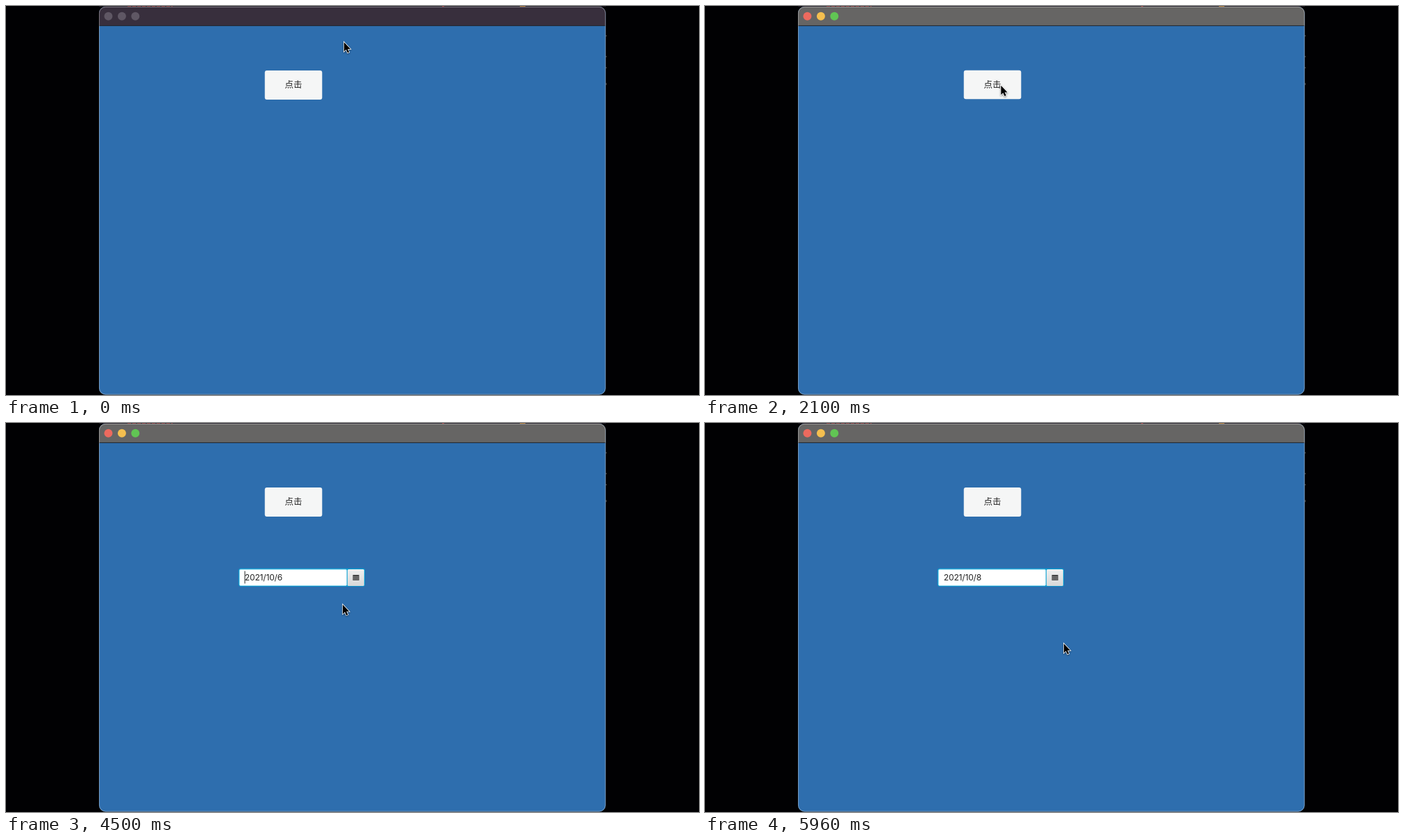
An HTML page that plays this animation: 998x561 px, repeating every 6 s.

```html
<!DOCTYPE html>
<html lang="zh">
<head>
<meta charset="utf-8">
<style>
  html, body { margin: 0; height: 100%; overflow: hidden; background: #000; }
  svg { display: block; }
  text { font: 12.4px Inter, "Noto Sans CJK SC", "Noto Sans CJK JP", sans-serif; fill: #222; }
  .mid { text-anchor: middle; }
  .cjk { font-family: "Noto Sans CJK SC", "Noto Sans CJK JP", sans-serif; }
  .week { font-size: 11.2px; font-weight: 700; }
  .line { fill: none; stroke: #555; }
  #date { font-size: 12px; letter-spacing: -.15px; }
  #popup { filter: drop-shadow(0 4px 3px rgba(0, 0, 0, .4)); }
  #cursor { filter: drop-shadow(0 1px 1px rgba(0, 0, 0, .45)); }
</style>
</head>
<body>
<svg width="998" height="561" viewBox="0 0 998 561">
  <defs>
    <linearGradient id="arrowFill" x2="0" y2="1">
      <stop stop-color="#f0f0f0"/><stop offset="1" stop-color="#d8d8d8"/>
    </linearGradient>
    <linearGradient id="headFill" x2="0" y2="1">
      <stop stop-color="#dadada"/><stop offset="1" stop-color="#ececec"/>
    </linearGradient>
    <linearGradient id="fieldFill" x2="0" y2="1">
      <stop stop-color="#ececec"/><stop offset=".14" stop-color="#fff"/>
    </linearGradient>
    <clipPath id="frame"><rect x="134" y="1" width="729.5" height="559.5" rx="9"/></clipPath>
  </defs>

  <!-- desktop and window -->
  <rect width="998" height="561" fill="#010103"/>
  <path d="M134 .5H864" stroke="#1c1822"/>
  <path d="M175 .5H240" stroke="#6e2326" stroke-dasharray="5 2"/>
  <path d="M628 .5h3" stroke="#8e2a2a"/>
  <path d="M740 .5h8" stroke="#9a6420"/>
  <path d="M864.3 42v2M864.3 72v2M864.3 88v2M864.3 111v3" stroke="#555"/>
  <g clip-path="url(#frame)">
    <rect x="134" width="730" height="561" fill="#2e6eae"/>
    <rect id="bar" x="134" width="730" height="28"/>
    <path d="M134 28.4H864" stroke="#20242b"/>
  </g>
  <rect x="134.4" y="1.4" width="728.8" height="558.8" rx="9" fill="none" stroke="#fff" stroke-opacity=".42" stroke-width=".9"/>
  <g id="lights">
    <circle cx="147.4" cy="14.7" r="6"/><circle cx="166.9" cy="14.7" r="6"/><circle cx="186.3" cy="14.7" r="6"/>
  </g>

  <rect id="button" x="372.7" width="82.6" rx="3" fill="#f5f6f6"/>
  <text class="mid cjk" x="414" y="118">点击</text>

  <g id="picker">
    <g id="plain">
      <rect x="334.7" y="209.6" width="182.4" height="27" rx="3" fill="#b9bcbf"/>
      <rect x="335.7" y="210.6" width="155.3" height="25" rx="2" fill="url(#fieldFill)"/>
    </g>
    <g id="focused">
      <rect x="334.9" y="209.8" width="182" height="26" rx="3" fill="#039ed3"/>
      <rect x="336.3" y="211.2" width="154.3" height="23.2" rx="1.5" fill="#fff" stroke="#b9e4f3" stroke-width=".7"/>
    </g>
    <rect id="arrow" x="491.8" y="211" width="24" height="24" rx="1.5"/>
    <rect x="499.5" y="219" width="9" height="8" fill="#444"/>
    <path d="M500.5 221.7h7M500.5 223.7h7M500.5 225.7h7" stroke="#ddd" stroke-width=".7" stroke-dasharray="1.2 .7"/>
    <text id="date" x="343.8" y="226.8"></text>
    <path id="caret" d="M344 213.5V231.5" stroke="#222"/>
  </g>

  <g id="popup">
    <rect x="334.8" y="236.2" width="234" height="219" fill="#b5b5b5"/>
    <rect x="336" y="237.3" width="231.8" height="31" fill="url(#headFill)"/>
    <rect x="336" y="269" width="231.8" height="185" fill="#f0f0f0"/>
    <path d="M336 268.6H568" stroke="#c4c4c4"/>
    <path class="line" d="M351.5 249.5l-5 3.5 5 3.5M405.5 249.5l5 3.5-5 3.5M508.5 249.5l-5 3.5 5 3.5M552.5 249.5l5 3.5-5 3.5"/>
    <text class="mid cjk" x="379" y="257.2">十月</text>
    <text class="mid" x="530.5" y="257.3">2021</text>
    <g id="cells"></g>
    <rect id="today" x="536.3" y="293" width="29.4" height="23.8" fill="none"/>
    <rect id="ring" x="437.4" y="320.6" width="29.2" height="23.4" fill="none" stroke="#55bfe0"/>
  </g>

  <path id="cursor" d="M.8 1.2V14.6L3.8 11.8 6 16.6 8.2 15.6 6 11H10Z" stroke="#fff" stroke-width="1.5" paint-order="stroke"/>
</svg>
<script>
const LOOP = 6000, COL = 33, ROW = 27.2, LEFT = 336.1, TOP = 291.5;
const $ = id => document.getElementById(id);
const show = (id, on) => $(id).style.display = on ? '' : 'none';
const set = (id, attrs) => { for (const k in attrs) $(id).setAttribute(k, attrs[k]); };
const within = (t, ...spans) => spans.some(([a, b]) => t >= a && t < b);

function add(tag, attrs, label) {
  const el = document.createElementNS('http://www.w3.org/2000/svg', tag);
  for (const k in attrs) el.setAttribute(k, attrs[k]);
  if (label !== undefined) el.textContent = label;
  return $('cells').appendChild(el);
}

[...'日一二三四五六'].forEach((d, i) =>
  add('text', { class: 'mid cjk week', x: 352.8 + COL * i, y: 284.2 }, '周' + d));

// The grid starts on September 26; October has 31 days.
const cells = Array.from({ length: 42 }, (_, i) => {
  const day = i - 4, inMonth = day > 0 && day < 32;
  const x = LEFT + COL * (i % 7), y = TOP + ROW * Math.floor(i / 7);
  const base = inMonth ? '#fff' : '#f5f5f5';
  const box = add('rect', { x, y, width: Math.min(COL, 567.8 - x), height: Math.min(ROW, 454.3 - y), stroke: '#e6e6e6', 'stroke-width': .8 });
  const label = add('text', { class: 'mid', x: x + 16.8, y: y + 17.9 }, day < 1 ? day + 30 : inMonth ? day : day - 31);
  return { day, x, y, base, box, label };
});

// Pointer stops: time, x, y
const path = [
  [30, 486, 51], [370, 425.5, 113.5], [2850, 425.5, 113.5], [3130, 521, 235],
  [3300, 498, 216], [3570, 498, 216], [3970, 441, 341], [4120, 441, 341],
  [4720, 503, 226], [5150, 503, 226], [5560, 519, 326], [5910, 519, 326], [5960, 516, 317]
];

function pointer(t) {
  const i = path.findIndex(p => p[0] > t);
  if (i < 1) return (i ? path[path.length - 1] : path[0]).slice(1);
  const [a, ax, ay] = path[i - 1], [b, bx, by] = path[i];
  const u = (t - a) / (b - a), e = u * u * (3 - 2 * u);
  return [ax + (bx - ax) * e, ay + (by - ay) * e];
}

function draw(t) {
  const [x, y] = pointer(t);
  const active = t >= 400, focus = t >= 3500;
  const open = within(t, [3500, 4100], [4760, 5700]);
  const second = t >= 4760;

  set('cursor', { transform: `translate(${x} ${y})` });
  set('bar', { fill: active ? '#666564' : '#382f3d' });
  const colours = active ? ['#ed6a5e', '#f5bf4f', '#61c554'] : Array(3).fill('#5f5764');
  [...$('lights').children].forEach((c, i) => c.setAttribute('fill', colours[i]));
  set('button', active && !focus ? { y: 92.8, height: 41.4 } : { y: 93.1, height: 41.8 });

  show('picker', within(t, [500, 1200], [1630, 2100], [2630, LOOP]));
  show('plain', !focus);
  show('focused', focus);
  show('caret', within(t, [3500, 3950], [4450, 4950], [5450, 5950]));
  $('date').textContent = t < 4110 ? '' : t < 5700 ? '2021/10/6' : '2021/10/8';
  const overArrow = x > 491 && x < 517 && y > 210 && y < 236;
  set('arrow', { fill: open ? '#d5d6d8' : overArrow ? '#f1f1f1' : 'url(#arrowFill)' });

  show('popup', open);
  show('ring', second);
  set('today', { stroke: second ? '#999' : '#1b9fca' });
  for (const c of cells) {
    const over = x >= c.x && x < c.x + COL && y >= c.y && y < c.y + ROW;
    const pressed = over && within(t, [3990, 4100], [5600, 5700]);
    const blue = pressed || (second && c.day === 6);
    c.box.setAttribute('fill', blue ? '#0096c9' : over ? '#cce3f4' : c.base);
    c.label.style.fill = blue ? '#fff' : '';
  }
}

function tick() {
  draw(performance.now() % LOOP);
  requestAnimationFrame(tick);
}
tick();
</script>
</body>
</html>
```
